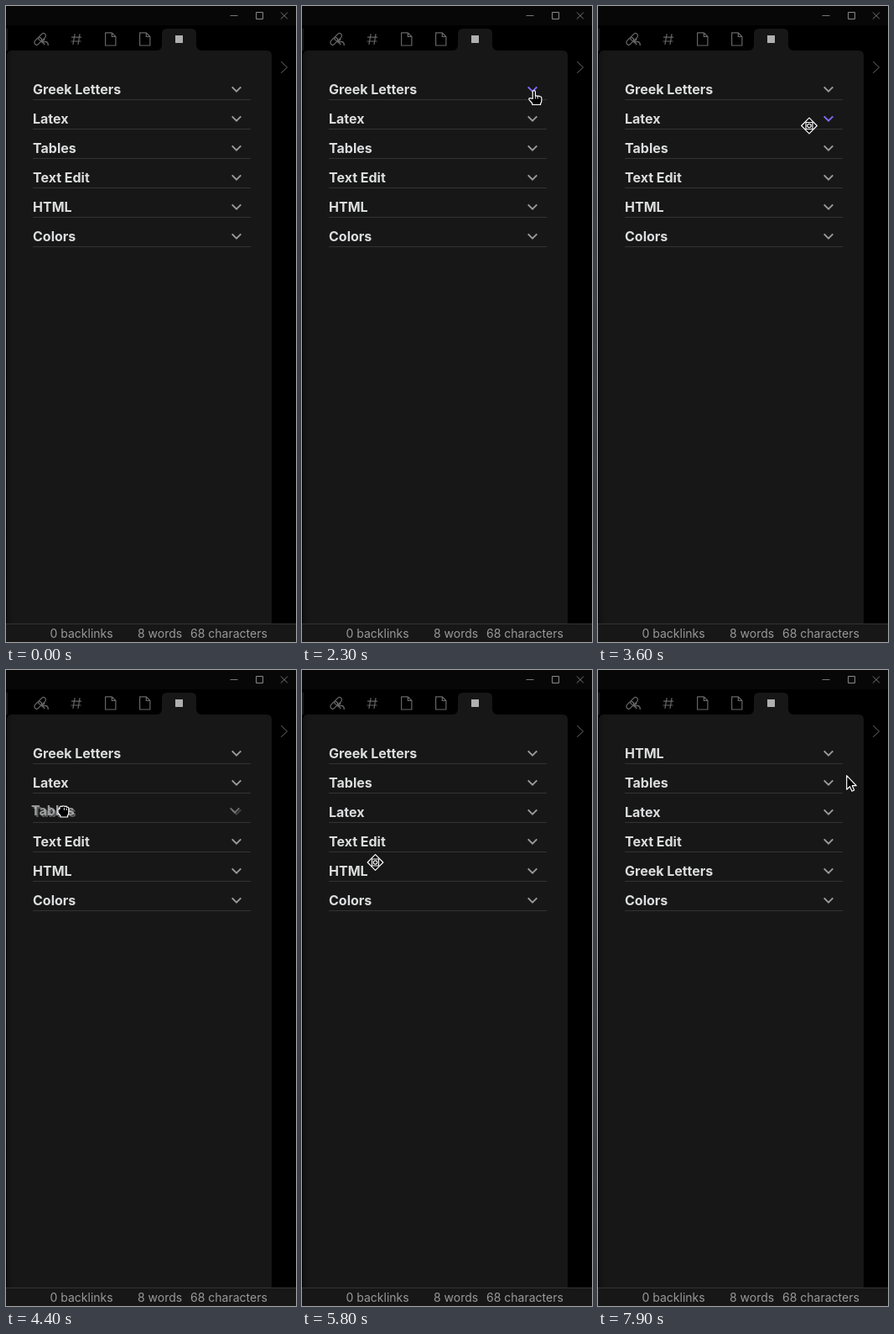
An HTML page with a canvas for the animation above (8 s loop, 346 by 757 pixels).

```html
<!DOCTYPE html>
<html lang="en">
<head>
<meta charset="utf-8">
<title>Sidebar accordion</title>
<style>
html, body { margin: 0; width: 100%; height: 100%; overflow: hidden; background: #000; }
canvas { display: block; width: 346px; height: 757px; }
</style>
</head>
<body>
<canvas id="stage"></canvas>
<script>
const W = 346, H = 757, LOOP = 8000, STEP = 100;
const BG = '#171717', TEXT = '#dcddde', MUTED = '#999', ICON = '#666', ACCENT = '#7f6df2';
const canvas = document.getElementById('stage');
const ctx = canvas.getContext('2d');
const dpr = window.devicePixelRatio || 1;
canvas.width = W * dpr;
canvas.height = H * dpr;

// Cursor keys: time, x, y, shape
const CURSOR = [
  [300, 334, 149, 'arrow'], [400, 210, 130, 'arrow'], [500, 19, 92, 'arrow'],
  [600, 170, 61, 'arrow'], [700, 305, 99, 'arrow'], [900, 287, 98, 'hand'],
  [1000, 278, 98, 'hand'], [1300, 277, 101, 'hand'], [2300, 277, 101, 'hand'],
  [2600, 276, 132, 'hand'], [3500, 276, 132, 'hand'], [3600, 252, 142.5, 'move'],
  [4200, 70, 170, 'move'], [4300, 70, 170, 'fist'], [4400, 68, 168, 'fist'],
  [4900, 78, 134, 'fist'], [5000, 78, 132.5, 'move'], [5300, 88, 191, 'move'],
  [5600, 97, 218, 'move'], [6000, 78, 240, 'move'], [6100, 77, 238, 'move'],
  [6200, 73, 233, 'fist'], [6400, 85, 111, 'fist'], [6600, 89, 108, 'fist'],
  [6900, 89, 108, 'move'], [7200, 89, 108, 'move'], [7400, 150, 101, 'move'],
  [7600, 262, 116, 'move'], [7700, 297, 126, 'arrow'], [7900, 296, 125, 'arrow']
];

const DRAGS = [
  { name: 'Tables', from: 4300, to: 5000, x: 70, y: 170, row: 2 },
  { name: 'HTML', from: 6200, to: 6900, x: 77, y: 238, row: 4 }
];

const SECTIONS = {
  'Greek Letters': {
    from: 1300, to: 2300, height: 431, rows: 8,
    signs: 'αβγδεζηθικλμνξοπρστυφχψωΑΒΓΔΕΖΗΘΙΚΛΜΝΞΟΠΡΣΤΥΦΧΨΩ'
  },
  'Latex': {
    from: 2900, to: 3600, height: 363, rows: 7,
    signs: '∑∏∫∮√∞±×÷·≤≥≠≈≡∝∈∉⊂⊃⊆⊇∪∩∀∃¬∧∨∅→←↔⇒⇐⇔∂∇∥⊥∠°'
  }
};

const SHAPES = {
  arrow: 'M.7.7V17.2L4.5 13.7L7 19.2L9.7 18L7.3 12.7H12.2Z',
  hand: 'M-1.8 9.5V1.2a1.6 1.6 0 0 1 3.2 0V6.2q1.6-1 2.8.3 1.6-.8 2.6.5 2-.5 2 1.6V12q0 2-1.2 3.2V16.5H-2.2V15L-6 10.6q-.8-2 1.2-1.9z',
  fist: 'M-6-1q0-2 2-1.5V-4.5q1-2 3-1 1.4-1.5 3 0 2-.8 2.8.8 2-.3 2 1.6V2q0 2-1.2 3.2V7H-3V5.5L-6 2z',
  move: 'M0-9.3L9.3 0L0 9.3L-9.3 0Z'
};
for (const k in SHAPES) SHAPES[k] = new Path2D(SHAPES[k]);

function stroke(d, color, width = 1) {
  ctx.strokeStyle = color;
  ctx.lineWidth = width;
  ctx.stroke(new Path2D(d));
}

function box(x, y, w, h, color) {
  ctx.fillStyle = color;
  ctx.fillRect(x, y, w, h);
}

function label(text, x, y, color, font) {
  ctx.font = font;
  ctx.fillStyle = color;
  ctx.fillText(text, x, y);
}

function fileIcon(x) {
  stroke(`M${x} 31.8H${x + 7.7}L${x + 12.3} 36.4V47H${x}ZM${x + 7.7} 31.8V36.4H${x + 12.3}`, ICON, 1.2);
}

function drawFrame() {
  box(0, 0, W, H, '#000');
  box(0, 0, W, 23, '#070707');
  stroke('M267.5 11.5H276.5', '#777');
  stroke('M298.5 7.5H306.5V15.5H298.5Z', '#888');
  stroke('M328 7.5L336 15.5M336 7.5L328 15.5', '#777');

  // Panel with its active tab
  const shade = ctx.createLinearGradient(0, 0, 8, 0);
  shade.addColorStop(0, '#101010');
  shade.addColorStop(1, BG);
  ctx.fillStyle = shade;
  ctx.fill(new Path2D('M1 735V59Q1 53 7 53H311Q317 53 317 59V735Z'));
  box(0, 27, 2, 26, BG);
  ctx.fillStyle = BG;
  ctx.fill(new Path2D('M179 53Q186 53 186 46V33Q186 27 192 27H221Q227 27 227 33V46Q227 53 234 53Z'));

  // Tab icons
  ctx.lineJoin = ctx.lineCap = 'round';
  ctx.save();
  ctx.translate(41, 39);
  ctx.rotate(-Math.PI / 4);
  ctx.strokeStyle = ICON;
  ctx.lineWidth = 1.2;
  ctx.beginPath();
  ctx.roundRect(-9, -2.8, 10, 5.6, 2.8);
  ctx.roundRect(-2, -2.8, 10, 5.6, 2.8);
  ctx.stroke();
  ctx.restore();
  stroke('M46 39.5L42.5 42.5L46 45.5M43 42.5H47Q50 42.5 50.3 46.5', ICON, 1.4);
  stroke('M82 33.5L80 45.5M88 33.5L86 45.5M78.5 37.2H89.5M78 42H89', ICON, 1.2);
  fileIcon(118.6);
  fileIcon(159.6);
  box(202, 35, 9, 9, '#b0b0b0');
  stroke('M328.5 66.5L335.5 73L328.5 79.5', '#666');
}

function drawStatus() {
  box(0, 735, W, 22, BG);
  box(0, 735, W, 1, '#333');
  const font = '14px Inter, sans-serif';
  label('0 backlinks', 52.5, 752, MUTED, font);
  label('8 words', 157, 752, MUTED, font);
  label('68 characters', 220, 752, MUTED, font);
}

function heading(name, x, y, color, open) {
  label(name, x, y + 6, TEXT, 'bold 16px Inter, sans-serif');
  const s = open ? -1 : 1, cx = x + 243;
  ctx.lineCap = 'butt';
  ctx.lineJoin = 'miter';
  stroke(`M${cx - 5.3} ${y - 2.6 * s}L${cx} ${y + 2.7 * s}L${cx + 5.3} ${y - 2.6 * s}`, color, 2);
}

function drawSigns(section, top) {
  const gap = (section.height - 8) / section.rows;
  ctx.textAlign = 'center';
  [...section.signs].forEach((sign, i) => {
    const x = 54 + (i % 6) * 43, y = top + (Math.floor(i / 6) + 0.5) * gap + 6;
    label(sign, x, y, TEXT, '18px "Noto Sans", "DejaVu Sans", sans-serif');
  });
  ctx.textAlign = 'left';
}

function rowOrder(t) {
  const names = ['Greek Letters', 'Latex', 'Tables', 'Text Edit', 'HTML', 'Colors'];
  const swap = (a, b) => { [names[a], names[b]] = [names[b], names[a]]; };
  if (t >= 5000) swap(1, 2);
  if (t >= 6900) swap(0, 4);
  return names;
}

function drawRows(t) {
  const hover = t >= 900 && t < 2500 ? 'Greek Letters' : t >= 2500 && t < 3700 ? 'Latex' : '';
  let y = 99;
  for (const name of rowOrder(t)) {
    const section = SECTIONS[name];
    const open = section && t >= section.from && t < section.to;
    heading(name, 32, y, name === hover ? ACCENT : MUTED, open);
    box(32, y + 12, 260, 1, '#333');
    if (open) {
      drawSigns(section, y + 16);
      y += section.height;
    }
    y += 35;
  }
  if (y > 720) {
    ctx.fillStyle = '#2b2b2b';
    ctx.beginPath();
    ctx.roundRect(306, 53, 11, 668, 5);
    ctx.fill();
  }
}

function cursorAt(t) {
  let i = CURSOR.length - 1;
  while (i >= 0 && CURSOR[i][0] > t) i--;
  if (i < 0) return null;
  const [t0, x, y, shape] = CURSOR[i];
  const next = CURSOR[i + 1];
  if (!next) return { x, y, shape };
  // Hold still between a settled pose and a change of shape
  const k = next[3] === shape ? (t - t0) / (next[0] - t0) : 0;
  return { x: x + (next[1] - x) * k, y: y + (next[2] - y) * k, shape };
}

function drawGhost(t, cur) {
  const drag = DRAGS.find(d => t >= d.from && t < d.to);
  if (!drag) return;
  ctx.save();
  ctx.globalAlpha = 0.65;
  ctx.translate(cur.x - drag.x, cur.y - drag.y);
  const y = 99 + drag.row * 35;
  box(32, y - 12, 260, 24, BG);
  heading(drag.name, 32, y, MUTED, false);
  ctx.restore();
}

function drawCursor({ x, y, shape }) {
  ctx.save();
  ctx.translate(x, y);
  ctx.lineJoin = 'round';
  ctx.fillStyle = '#000';
  ctx.strokeStyle = '#fff';
  ctx.lineWidth = 1.2;
  ctx.fill(SHAPES[shape]);
  ctx.stroke(SHAPES[shape]);
  if (shape === 'move') {
    ctx.strokeRect(-4, -4, 8, 8);
    ctx.beginPath();
    ctx.arc(0, 0, 2.2, 0, Math.PI * 2);
    ctx.stroke();
  } else if (shape !== 'arrow') {
    const top = shape === 'hand' ? 6.5 : -4;
    stroke(`M1.4 ${top}v3M4.2 ${top + 0.5}v2.5`, '#fff', 0.9);
  }
  ctx.restore();
}

function draw(now) {
  const t = Math.floor((now % LOOP) / STEP) * STEP;
  ctx.setTransform(dpr, 0, 0, dpr, 0, 0);
  drawFrame();
  drawRows(t);
  drawStatus();
  const cur = cursorAt(t);
  if (cur) {
    drawGhost(t, cur);
    drawCursor(cur);
  }
}

let start;
function tick(now) {
  if (start === undefined) start = now;
  draw(now - start);
  requestAnimationFrame(tick);
}
draw(0);
requestAnimationFrame(tick);
</script>
</body>
</html>
```
